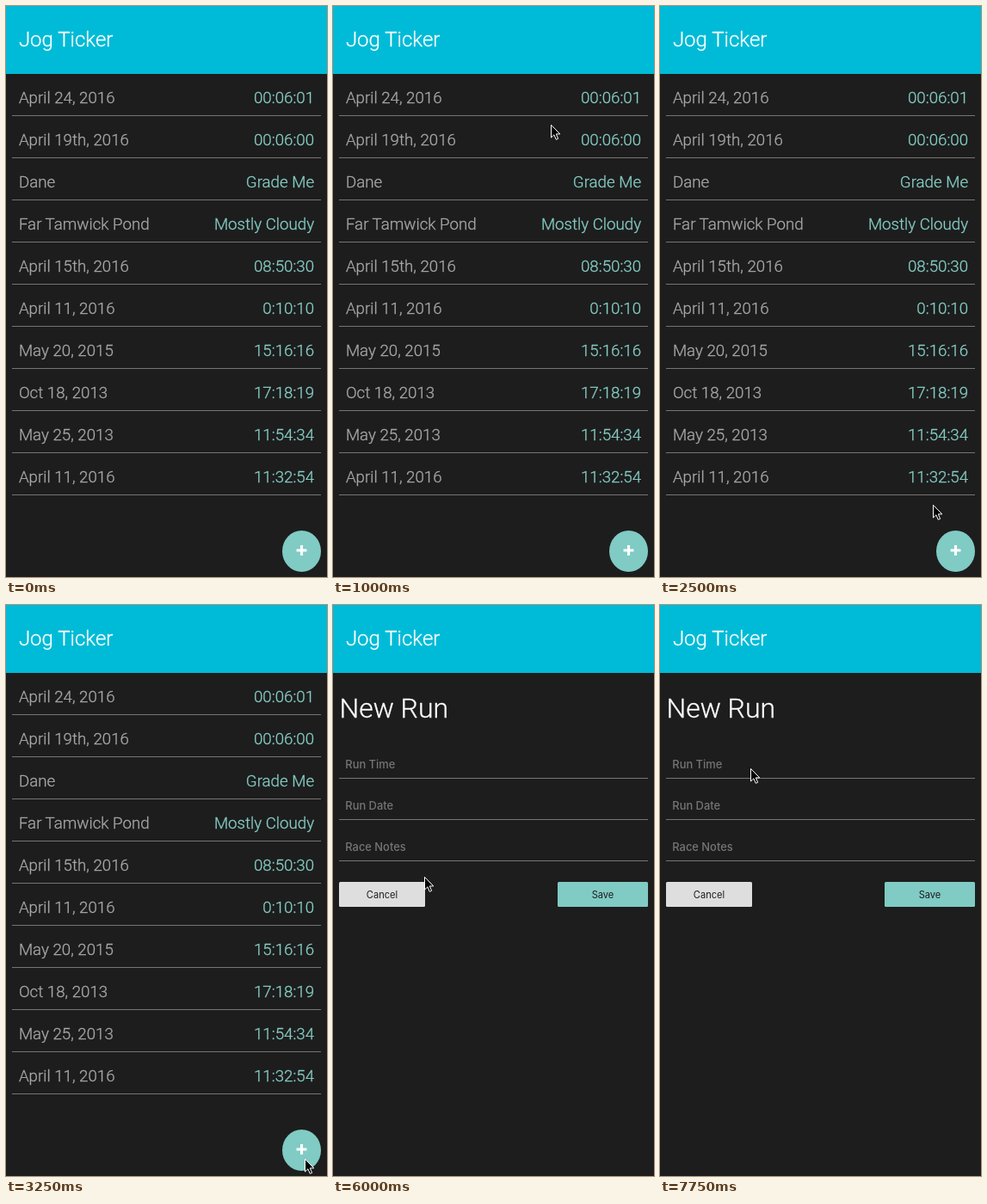
An HTML page that plays this animation: 373x664 px, repeating every 8 s.

```html
<!DOCTYPE html>
<html lang="en">
<head>
<meta charset="utf-8">
<title>Jog Ticker</title>
<style>
  html, body { margin: 0; width: 100%; height: 100%; overflow: hidden; background: #1d1d1d; }
  svg { display: block; width: 373px; height: 664px; }
  text { white-space: pre; }
  /* a hairline stroke thickens the light weight slightly */
  .title, .heading, .label, .value { font-family: Roboto, sans-serif; font-weight: 300; stroke-width: .3px; }
  .title { font-size: 24px; fill: #fff; stroke: #fff; }
  .heading { font-size: 32px; fill: #fff; stroke: #fff; }
  .label, .value { font-size: 18.72px; }
  .label { fill: #a8a8a8; stroke: #a8a8a8; }
  .value { fill: #86cec5; stroke: #86cec5; text-anchor: end; }
  .hint { font: 500 12.9px Inter, sans-serif; fill: #757575; }
  .button { font: 400 11.1px Inter, sans-serif; fill: #1d1d1d; text-anchor: middle; }
  .rule { fill: #757575; }
</style>
</head>
<body>
<svg viewBox="0 0 373 664">
  <rect width="373" height="664" fill="#1d1d1d"/>
  <rect width="373" height="79" fill="#00bbd7"/>
  <text class="title" x="14.9" y="47">Jog Ticker</text>

  <g id="list">
    <ellipse cx="343.5" cy="634" rx="22.5" ry="24" fill="#80cbc4"/>
    <path d="M339.1 633H347.9M343.5 628.6V637.4" stroke="#fff" stroke-width="3.1" stroke-linecap="square"/>
  </g>

  <g id="form">
    <text class="heading" x="7.4" y="131">New Run</text>
    <rect x="7" y="322" width="100" height="29" rx="1.5" fill="#dedede"/>
    <text class="button" x="57" y="341">Cancel</text>
    <rect x="261" y="322" width="105" height="29" rx="1.5" fill="#80cbc4"/>
    <text class="button" x="313.5" y="341">Save</text>
    <rect id="caret" x="15" y="178" width="1" height="15" fill="#ddd"/>
  </g>

  <path id="cursor" d="M.5 1.3V16L3.9 12.8L6.3 18.3L8.6 17.3L6.3 11.9H10.8Z" fill="#000" stroke="#fff"/>
</svg>
<script>
  const LOOP = 8000;
  const FORM_AT = 5250;
  const CARET = [7250, 7750];

  const runs = [
    ["April 24, 2016", "00:06:01"],
    ["April 19th, 2016", "00:06:00"],
    ["Dane", "Grade Me"],
    ["Far Tamwick Pond", "Mostly Cloudy"],
    ["April 15th, 2016", "08:50:30"],
    ["April 11, 2016", "0:10:10"],
    ["May 20, 2015", "15:16:16"],
    ["Oct 18, 2013", "17:18:19"],
    ["May 25, 2013", "11:54:34"],
    ["April 11, 2016", "11:32:54"]
  ];
  const fields = ["Run Time", "Run Date", "Race Notes"];

  // time, x, y of the pointer tip; each position holds until the next
  const moves = [
    [500, 370, 134], [750, 358, 137], [1000, 253, 137], [1750, 252, 140],
    [2000, 253, 470], [2500, 317, 579], [2750, 342, 623], [3000, 345, 643],
    [3250, 347, 643], [5750, 108, 333], [6000, 106, 315], [6250, 102, 200],
    [6500, 105, 189]
  ];

  const $ = id => document.getElementById(id);
  const list = $("list"), form = $("form"), caret = $("caret"), cursor = $("cursor");

  function add(parent, tag, attrs, text = "") {
    const el = document.createElementNS("http://www.w3.org/2000/svg", tag);
    for (const key in attrs) el.setAttribute(key, attrs[key]);
    el.textContent = text;
    parent.append(el);
  }
  const rule = (parent, y) => add(parent, "rect", { class: "rule", x: 7, y, width: 359, height: 1 });
  const show = (el, on) => el.setAttribute("visibility", on ? "visible" : "hidden");

  runs.forEach(([label, value], i) => {
    const y = 113 + i * 49;
    add(list, "text", { class: "label", x: 14.9, y }, label);
    add(list, "text", { class: "value", x: 358.1, y }, value);
    rule(list, y + 14);
  });
  fields.forEach((name, i) => {
    const y = 190 + i * 48;
    add(form, "text", { class: "hint", x: 14.3, y }, name);
    rule(form, y + 11);
  });

  function draw(now) {
    const t = now % LOOP;
    const inForm = t >= FORM_AT;
    show(list, !inForm);
    show(form, inForm);
    show(caret, t >= CARET[0] && t < CARET[1]);

    const at = moves.filter(m => m[0] <= t).pop();
    show(cursor, at);
    if (at) cursor.setAttribute("transform", `translate(${at[1]} ${at[2]})`);
  }

  const start = performance.now();
  function tick() {
    draw(performance.now() - start);
    requestAnimationFrame(tick);
  }
  tick();
</script>
</body>
</html>
```
